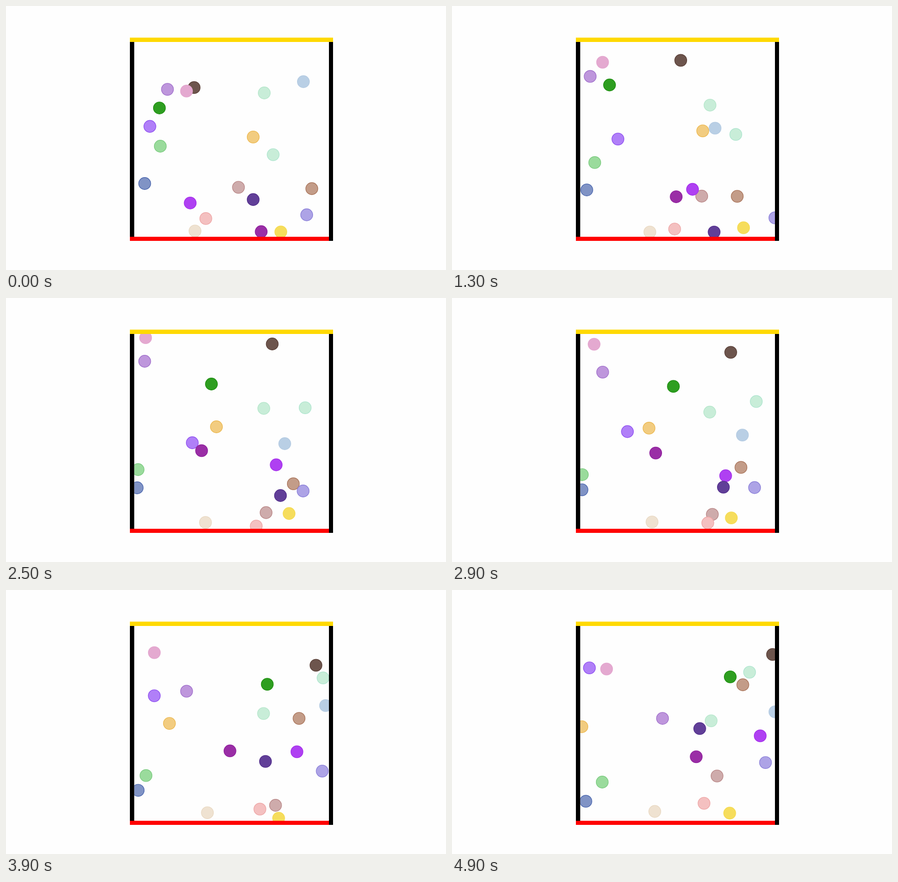
Write an HTML page that moves like this. It is 966x580 px and loops after 5 s.

```html
<!DOCTYPE html>
<html lang="en">
<head>
<meta charset="utf-8">
<title>Bouncing balls</title>
<style>
  html, body { margin: 0; width: 100%; height: 100%; overflow: hidden; background: #fefefe; }
  svg { display: block; width: 100%; height: 100%; }
</style>
</head>
<body>
<svg viewBox="0 0 966 580">
  <clipPath id="room"><rect x="281.5" y="79" width="427.5" height="428"/></clipPath>
  <g id="balls" clip-path="url(#room)" stroke-width="1.4"></g>
  <rect x="272" y="79" width="9.5" height="428" fill="#000"/>
  <rect x="709" y="79" width="9" height="437" fill="#000"/>
  <rect x="272" y="69.5" width="446" height="9.5" fill="#ffd900"/>
  <rect x="272" y="507" width="437" height="9" fill="#f00"/>
</svg>
<script>
const STEP = 100, STEPS = 50, MIDDLE = 25;
const REACH = 28;  // centre distance at which two balls collide
const LEFT = 286, RIGHT = 704.5, TOP = 84, BOTTOM = 502.3;
const layer = document.getElementById('balls');
const balls = [];

// Position and velocity (pixels per step) in the middle of the loop.
function ball(fill, stroke, x, y, vx, vy) {
  const el = document.createElementNS('http://www.w3.org/2000/svg', 'circle');
  el.setAttribute('r', 13.2);
  el.setAttribute('fill', fill);
  el.setAttribute('stroke', stroke);
  layer.append(el);
  balls.push({ el, x, y, vx, vy });
}

ball('#be96dc', '#a06fcb', 304.5, 139, 6.57, 5.96);
ball('#6d554d', '#5a4038', 584.5, 101, 6.86, 4.6);
ball('#2e9e20', '#1f8f12', 451, 189, 8.76, 1.29);
ball('#e4a9d0', '#e3a5ce', 306.5, 87.2, 1.37, 3.6);
ball('#c8edd8', '#b5e6cb', 566, 242.5, -0.04, 2.06);
ball('#b9cfe5', '#b4cbe2', 612, 320, 6.4, -4.72);
ball('#b07ff8', '#8f50f0', 409, 318, -5.96, -6.12);
ball('#9adb9c', '#7ccb80', 290, 377, -1.95, 2.76);
ball('#f2cc80', '#ecb850', 462, 283, -7.37, 0.72);
ball('#c8edd8', '#aee5cf', 656.8, 241.1, 2.81, -3.42);
ball('#8093c5', '#4a66ae', 288, 417, -0.66, 1.08);
ball('#ceabab', '#b98787', 571, 471.5, -1.87, 5.85);
ball('#af40f2', '#a42fea', 593.2, 366.5, 1.9, 6);
ball('#613f98', '#532f8c', 602.6, 434, -1.7, -4.6);
ball('#c39c88', '#a9745a', 630.8, 408.2, 0.9, -9.01);
ball('#ada3e6', '#8a7fd8', 652.3, 424, 3, -1.87);
ball('#f4c0c0', '#eea6a6', 549.4, 501.2, 5.05, 0.93);
ball('#9a2ea6', '#8f1f9c', 429.4, 335.4, 4.45, 1.29);
ball('#efe2d1', '#e9d9c3', 438, 493.2, 0.3, -0.28);
ball('#f6dd5c', '#f5da50', 621.5, 473.5, -2.06, 2.4);

// Equal masses: approaching balls swap their speeds along the line of centres.
function collide(a, b) {
  const dx = b.x - a.x, dy = b.y - a.y, d = Math.hypot(dx, dy);
  const nx = dx / d, ny = dy / d;
  const speed = (b.vx - a.vx) * nx + (b.vy - a.vy) * ny;
  if (d > REACH || speed >= 0) return;
  a.vx += speed * nx;
  a.vy += speed * ny;
  b.vx -= speed * nx;
  b.vy -= speed * ny;
}

function bounce(b) {
  if (b.x < LEFT) b.vx = Math.abs(b.vx);
  if (b.x > RIGHT) b.vx = -Math.abs(b.vx);
  if (b.y < TOP) b.vy = Math.abs(b.vy);
  if (b.y > BOTTOM) b.vy = -Math.abs(b.vy);
}

// Elastic motion works in both directions of time, so the loop grows from its middle.
const history = [];
function run(direction) {
  const state = balls.map(({ x, y, vx, vy }) => ({ x, y, vx: vx * direction, vy: vy * direction }));
  for (let n = MIDDLE; n >= 0 && n < STEPS; n += direction) {
    history[n] = state.map(({ x, y }) => ({ x, y }));
    state.forEach((a, i) => state.slice(i + 1).forEach(b => collide(a, b)));
    for (const b of state) {
      bounce(b);
      b.x += b.vx;
      b.y += b.vy;
    }
  }
}
run(1);
run(-1);

function draw(step) {
  history[step].forEach(({ x, y }, i) => {
    balls[i].el.setAttribute('cx', x);
    balls[i].el.setAttribute('cy', y);
  });
}

const start = performance.now();
function tick() {
  draw(Math.floor((performance.now() - start) / STEP) % STEPS);
  requestAnimationFrame(tick);
}
tick();
</script>
</body>
</html>
```
